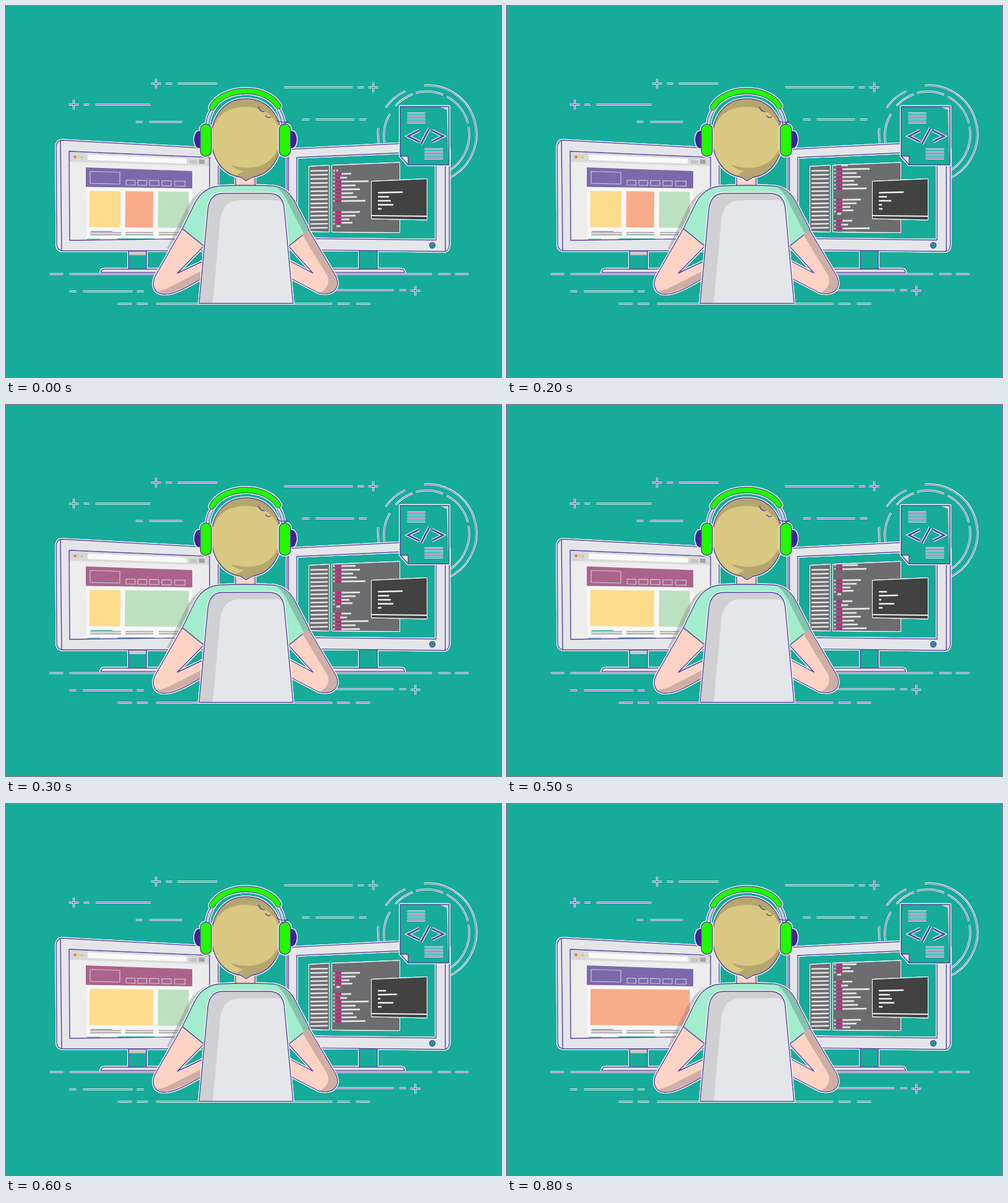
Write an HTML page without scripts that moves like this. It is 800 px wide and 600 px high and loops after 900 ms.

```html
<!DOCTYPE html>
<html lang="en">
<head>
<meta charset="utf-8">
<title>Coder at work</title>
<style>
  :root { --bg: #17ab9a; --ink: #54429a; --body: #e5e6ea; --skin: #fcd3c5; --green: #22f800; }
  html, body { margin: 0; width: 100%; height: 100%; overflow: hidden; background: var(--bg); }
  svg { display: block; width: 100%; height: 100%; }

  .halo { filter: drop-shadow(1px 0 0 #fff) drop-shadow(-1px 0 0 #fff) drop-shadow(0 1px 0 #fff) drop-shadow(0 -1px 0 #fff); }
  .ink { stroke: var(--ink); stroke-width: 1.4; stroke-linejoin: round; }
  .line { fill: none; stroke: var(--ink); stroke-width: 1; }
  .glow { fill: none; stroke: #fff; stroke-width: 3; }
  .body { fill: var(--body); }
  .skin { fill: var(--skin); }
  .shirt { fill: #a2edcd; }
  .green { fill: var(--green); }
  .back { fill: var(--bg); }
  .none { fill: none; }

  .yellow { fill: #fddc8b; }
  .salmon { fill: #f8ab8a; }
  .mint { fill: #bde1c0; }
  .white { fill: none; stroke: #f2f2f2; stroke-width: 2.5; }
  .pink { fill: none; stroke: #d6148c; stroke-width: 3; }

  .banner, .yellow, .salmon, .mint, .out { animation: .9s -1ms infinite step-end; }
  .banner { animation-name: banner; }
  .yellow { animation-name: yellow; }
  .salmon { animation-name: salmon; }
  .mint { animation-name: mint; }
  .outA { animation-name: outA; }
  .outB { animation-name: outB; }
  .outC { animation-name: outC; }
  .scroll { animation: scroll .9s -1ms steps(9) infinite; }

  @keyframes scroll { to { transform: translateY(-90px); } }
  @keyframes banner {
    0%, 77.777% { fill: #7b69ab; }
    33.333% { fill: #ab6389; }
  }
  @keyframes yellow {
    0% { width: 50px; }
    55.555% { width: 103px; }
    77.777% { width: 0; }
  }
  @keyframes salmon {
    0% { x: 193px; width: 45px; }
    33.333% { x: 193px; width: 0; }
    77.777% { x: 135px; width: 160.5px; }
  }
  @keyframes mint {
    0%, 55.555% { x: 246px; width: 49.5px; }
    33.333% { x: 192.5px; width: 103px; }
    77.777% { x: 246px; width: 0; }
  }
  @keyframes outA {
    0%, 33.333%, 88.888% { opacity: 1; }
    11.111%, 55.555% { opacity: 0; }
  }
  @keyframes outB {
    0%, 33.333% { opacity: 0; }
    11.111% { opacity: 1; }
  }
  @keyframes outC {
    0%, 88.888% { opacity: 0; }
    55.555% { opacity: 1; }
  }
</style>
</head>
<body>
<svg viewBox="0 0 800 600">
  <defs>
    <clipPath id="editor"><path d="M527 258L636 253.500V366L527 365Z"/></clipPath>
    <g id="block">
      <path class="pink" d="M533 271h9m-9 6.300h7m-7 6.300h9m-9 6.300h9m-9 6.300h9m-9 6.300h9m-9 6.300h9m-9 6.300h9M533 333h9m-9 6h9m-9 5.800h9m-9 5.500h9"/>
      <path class="white" d="M542 271h16m-18 6.300h11m-9 6.300h44m-44 6.300h23m-23 6.300h30m-30 6.300h19m-19 6.300h25m-25 6.300h39M542 333h30m-30 6h23m-23 5.800h13m-13 5.500h18M534 355.500h6"/>
      <path class="white" stroke-dasharray="2.300 3.900" d="M530 270V317.500M530 332V357"/>
    </g>
    <path id="plus" d="M-8 0H8M0-8V8"/>
    <g id="sky">
      <use href="#plus" x="109" y="159"/>
      <use href="#plus" x="242" y="125"/>
      <use href="#plus" x="593" y="131"/>
      <use href="#plus" x="661" y="460"/>
      <path d="M125 159h9m10 0h89M258 125h10m9 0h64M209 187h11m11 0h53
        M449 131h111m8 0h10M478 183h12m10 0h62m8 0h12
        M70 433h22m10 0h160M510 433h178m10 0h20m7 0h22
        M102 461h11m11 0h80m7 0h11M533 459h93m9 0h11
        M180 481h23m8 0h18m13 0h285m8 0h20m10 0h23"/>
      <path d="M675 128A79 79 0 0 1 717 277M613 164A79 79 0 0 1 645 137M601 197Q600 209 602 221"/>
      <path d="M614 232A69 69 0 0 1 620 174M629 161A69 69 0 0 1 657 142M662 140A69 69 0 0 1 706 143M712 146A69 69 0 0 1 746 189M747 195A69 69 0 0 1 717 265"/>
    </g>
    <path id="text" d="M648 173h29m-29 5h29m-29 5h29m-29 5h29M676 231h30m-30 5h30m-30 5h30m-30 5h30"/>
    <path id="tag" d="M667 201L649 210L667 219M684 197L670 223M688 201L706 210L688 219"/>
    <path id="band" d="M333 164C352 129 421 129 440 162"/>
  </defs>
  <rect class="back" width="800" height="600"/>

  <!-- Background lines and rings -->
  <g transform="translate(.5 .5)">
    <use class="glow" href="#sky"/>
    <use class="line" href="#sky"/>
  </g>

  <!-- Left monitor -->
  <g class="halo">
    <path class="back ink" d="M198 396H227V426H198Z"/>
    <path fill="#c9c9cd" d="M199 397H226V403H199Z"/>
    <path class="body ink" d="M153 431Q154 425.500 159 425.500H255V431Z"/>
    <path class="body ink" d="M90 217L343 231V396H90Q82 394 82 386L81 228Q82 217 90 217Z"/>
    <path class="none ink" d="M88 218L90 396"/>
    <path class="ink" fill="#ededee" d="M102 235L329 245V376L103 379Z"/>
  </g>
  <path fill="#d9d9db" d="M103 236L328 245.500V259L103 252Z"/>
  <path fill="#fafafa" d="M132 240L292 247V255L132 249Z"/>
  <path fill="#c4c4c4" d="M297 249l12 .5v6l-12-.5z"/>
  <path fill="#a3a3a3" d="M312 248l9 .5v7l-9-.5z"/>
  <circle cx="111.500" cy="244" r="2.400" fill="#ec7474"/>
  <circle cx="117" cy="244.300" r="2.400" fill="#f3d355"/>
  <circle cx="122.500" cy="244.600" r="2.400" fill="#a8d59a"/>
  <path fill="#f7f7f7" d="M129 261L301 267V376L130 377Z"/>
  <path class="banner" d="M129 261L301 267V295L129 292.500Z"/>
  <path fill="none" stroke="#cfc6df" stroke-width="1.200" d="M136 267.500l48 1.500v19l-48-1.200zM194 281.500l14.500.3v8l-14.500-.3zm19 .4l14.500.3v8l-14.500-.3zm19 .3l15 .3v8l-15-.3zm20 .4l15 .3v8l-15-.3zm20.500.4l17 .3v8l-17-.3z"/>
  <g transform="rotate(.5 135 299)">
    <rect class="yellow" x="135" y="299" width="50" height="58.500"/>
    <rect class="salmon" x="193" y="299" width="45" height="58.500"/>
    <rect class="mint" x="246" y="299" width="49.500" height="58.500"/>
  </g>
  <path fill="none" stroke="#a9a9a9" stroke-width="1.800" d="M136 366.500h50m7 0h45m9 0h42M136 370h50m7 0h45m9 0h42"/>
  <path fill="none" stroke="#17ab9a" stroke-width="1.200" d="M137 364.500h35M131 377h21m28-.5h60"/>

  <!-- Right monitor -->
  <g class="halo">
    <path class="back ink" d="M571 395H600V426H571Z"/>
    <path class="body ink" d="M515 431V425.500H639Q643 425.500 644.500 431Z"/>
    <path class="body ink" fill-rule="evenodd" d="M454 232L703 219Q716 219 716.500 232V388Q715 397 708 397L454 394ZM470 245L695 235V378.500L470 376Z"/>
    <path class="none ink" d="M710 225V396.500M456.500 234V300"/>
    <circle class="back ink" cx="689" cy="387" r="4.500"/>
    <path class="none ink" d="M687 387h4"/>
  </g>
  <g class="halo" fill="#6d6d6f">
    <path d="M490 260L522 258V365L490 364Z"/>
    <path d="M527 258L636 253.500V366L527 365Z"/>
  </g>
  <path transform="translate(0 9) skewY(-1)" fill="none" stroke="#e6e6e6" stroke-width="28" stroke-dasharray="2.500 4.100" d="M506 265V362"/>
  <g clip-path="url(#editor)">
    <g transform="translate(0 8) skewY(-.8)">
      <g class="scroll">
        <path class="white" d="M534 265.500h2.500M529 265.500h2.500"/>
        <use href="#block"/>
        <use href="#block" y="96"/>
      </g>
    </g>
  </g>
  <path class="halo" fill="#424242" d="M591 284L680 280V345.500L591 343.500Z"/>
  <path fill="none" stroke="#f0f0f0" stroke-width="2" d="M591 339L680 340"/>
  <g class="white">
    <path class="out outA" d="M601 302l40-1M601 308.500h18M601 315h21M601 321.500h25M601 328h6"/>
    <path class="out outB" d="M601 302l40-1M601 308.500h13M601 315h20M601 321.500h5M601 328h6"/>
    <path class="out outC" d="M601 302h13M601 308.500l31-.7M601 315h4M601 321.500h25M601 328h6"/>
  </g>

  <!-- Code document -->
  <g class="halo">
    <path class="back ink" d="M637 162.500H716V257H650L637 242.500Z"/>
    <path fill="#d5d5d8" d="M702 163.500H715V250L712.500 168Z"/>
    <path class="body ink" d="M637 242.500L650 243V257Z"/>
  </g>
  <g transform="translate(.5 .5)">
    <use class="glow" href="#text"/>
    <use class="line" href="#text"/>
    <use class="glow" href="#tag" style="stroke-width: 5"/>
    <use class="line" href="#tag" style="stroke-width: 2.800"/>
  </g>

  <!-- Person -->
  <path fill="#777" opacity=".35" d="M335 291C310 298 300 312 291 328L260 392L266 396L285 361L303 324Z"/>
  <g class="halo">
    <path class="skin ink" d="M371 272H402.500V296H371Z"/>
    <path class="skin ink" d="M285 360L320 388L277 432L324 410L318 440C290 456 270 468 252 466C238 464 235 449 241 437Z"/>
    <path class="skin ink" d="M489 362L456 388L496 432L456 411L461 441L505 464C530 470 541 455 533 437Z"/>
    <path class="shirt ink" d="M345 291Q388 289 432 291C455 295 464 309 471 325L490 362L455 390H322L285 360L302 325C310 307 322 293 345 291Z"/>
  </g>
  <path fill="#cfaea6" d="M319 427L270 452Q256 460 244 461Q250 466 256 465C275 463 297 451 318 439Z"/>
  <path fill="#cfaea6" d="M488 363L479 370L519 436Q526 452 508 464Q530 467 535 452Q535 443 532 437Z"/>
  <path fill="#86c3aa" d="M436 292C455 297 463 309 470 325L489 361L481 367L459 325Q451 304 436 292Z"/>

  <!-- Chair -->
  <g class="halo">
    <path fill="#d0d0d2" d="M312 481L326 330C328 311 337 303 350 303H427C441 304 449 312 450 330L464 481Z"/>
    <path class="body" d="M334 481L346 350C348 324 360 314 380 314H440Q449 318 450 332L464 481Z"/>
    <path class="none ink" d="M312 481L326 330C328 311 337 303 350 303H427C441 304 449 312 450 330L464 481Z"/>
  </g>

  <!-- Head -->
  <g class="halo">
    <path class="ink" fill="#b5a56f" d="M388 150C423 150 445 178 445 213C445 247 426 273 398 277L388 283L379 277C350 273 332 247 332 213C332 178 353 150 388 150Z"/>
    <path fill="#d8c882" d="M333 213C334 184 351 163 388 163C424 164 443 186 443 212C442 250 408 272 363 257Q371 265 384 267L372 274C349 267 333 245 333 213Z"/>
  </g>

  <!-- Headphones -->
  <g class="halo">
    <path class="none ink" d="M331 168Q324 178 323 193M335 170Q329 180 328 193M442 166Q450 178 451 193M438 168Q445 180 446 193"/>
    <ellipse cx="312" cy="216" rx="8" ry="14" fill="#48209a"/>
    <ellipse cx="462" cy="216" rx="8" ry="14" fill="#48209a"/>
    <rect class="green ink" x="314" y="191" width="18" height="52" rx="8.500"/>
    <rect class="green ink" x="441.500" y="191" width="18.500" height="52" rx="8.500"/>
    <g fill="none" stroke-linecap="round">
      <use href="#band" stroke="#54429a" stroke-width="10.500"/>
      <use href="#band" stroke="#22f800" stroke-width="8.200"/>
    </g>
  </g>
  <path class="none ink" d="M408 163Q410 171 418 171M419 177Q424 183 428 179M438 185Q447 190 456 187L446 193"/>
</svg>
</body>
</html>
```
